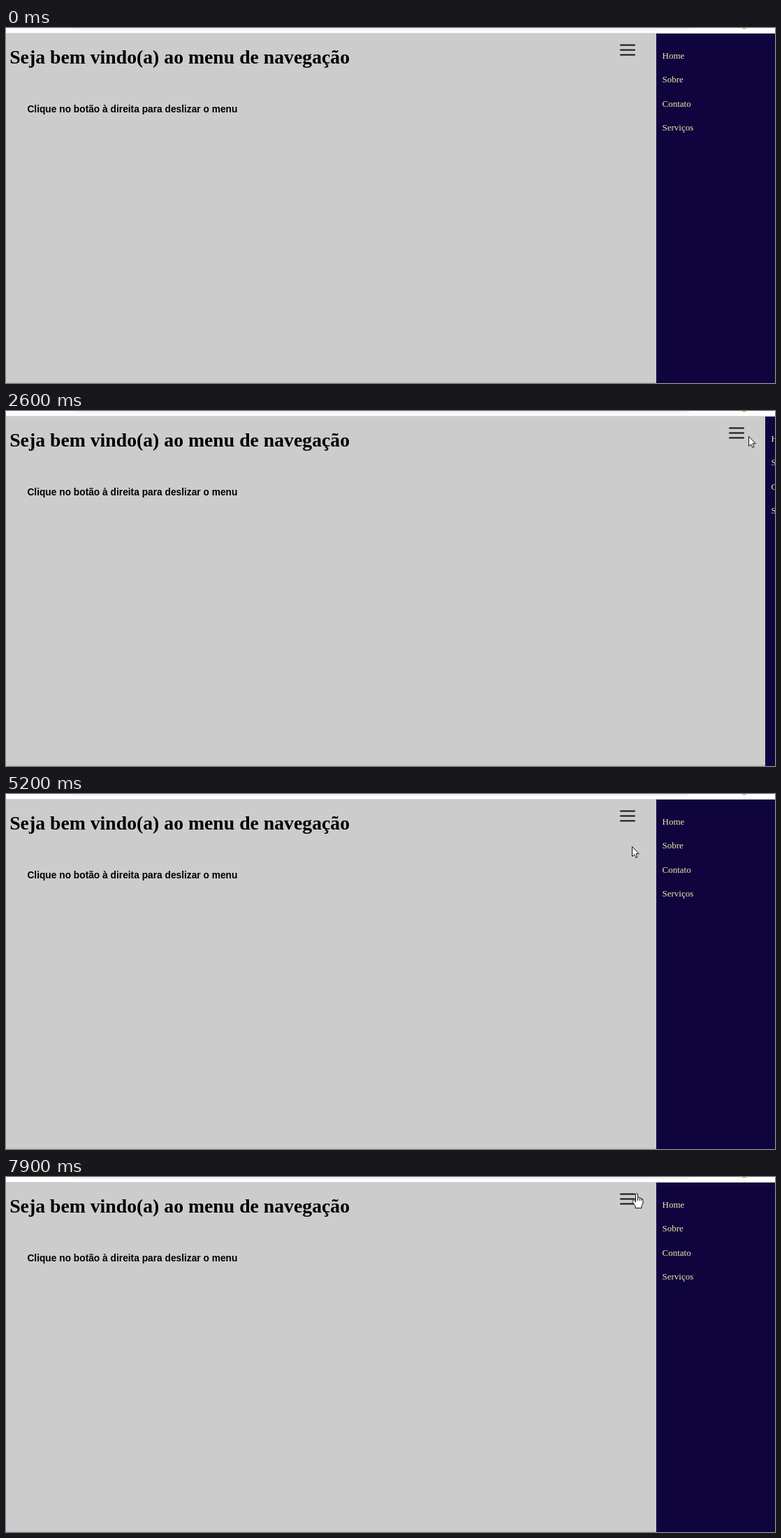
Recreate the animation shown at these times as an HTML page. Size 1101 by 509 pixels, loop 8000 ms.

```html
<!DOCTYPE html>
<html lang="pt">
<head>
<meta charset="utf-8">
<style>
  html, body { margin: 0; width: 100%; height: 100%; overflow: hidden; background: #ccc; }
  svg { display: block; width: 1101px; height: 509px; }
  .title { font: bold 27.74px "Liberation Serif", serif; }
  .hint { font: bold 13.75px "Liberation Sans", sans-serif; }
  #menu text { font: 13px "Liberation Serif", serif; fill: #eee8aa; }
  #cursor path { fill: #fff; stroke: #111; stroke-linejoin: round; }
</style>
</head>
<body>
<svg viewBox="0 0 1101 509">
  <rect width="1101" height="509" fill="#ccc"/>
  <rect y="507.5" width="1101" height="1.5" fill="#c3c3c3"/>
  <rect width="1101" height="7" fill="#fff"/>
  <rect y="7" width="1101" height="1" fill="#d6d6d6"/>
  <rect x="88" y="-25" width="898" height="28" rx="14" fill="#f1f3f4"/>
  <circle cx="1057" cy="-6" r="7" fill="#54b435"/>
  <text class="title" x="5.2" y="51">Seja bem vindo(a) ao menu de navegação</text>
  <text class="hint" x="30.4" y="121">Clique no botão à direita para deslizar o menu</text>
  <g id="menu">
    <path d="M880 24.5h20M880 31.5h20M880 38.5h20" stroke="#111" stroke-width="2" stroke-linecap="round"/>
    <rect x="931" y="8" width="170" height="501" fill="#10043e"/>
    <rect id="highlight" x="931" width="170" height="34.5" fill="#020456"/>
    <text x="939.5" y="43.5">Home</text>
    <text x="939.5" y="78">Sobre</text>
    <text x="939.5" y="112.5">Contato</text>
    <text x="939.5" y="147">Serviços</text>
  </g>
  <g id="cursor">
    <path id="arrow" d="M.5 .5V14.5L3.8 11.6 5.8 16.4 8 15.5 6 10.7H10.2Z"/>
    <path id="hand" d="M-1.5 1.5Q0 -.5 1.5 1.5V6.5Q3.5 5.3 4.3 7.2 6 6.3 6.8 8.2 9 7.7 9 10.5V15L7 18.5V21.5H-2V19L-6 12.5Q-6 9.6 -3.6 10.8L-1.5 13ZM1.5 6.5V11M4.3 7.2V11M6.8 8.2V11"/>
  </g>
</svg>
<script>
const LOOP = 8000, STEP = 100;
const PANEL_X = 931, PANEL_WIDTH = 170;
const CLOSE_AT = 1378, OPEN_AT = 2558, SLIDE_MS = 450;
const ITEM_TOP = 22, ITEM_HEIGHT = 34.5, ITEM_COUNT = 4;

// Where the pointer goes; it glides straight from one stop to the next
const stops = [
  { x: 47, y: -24, at: 0 },
  { x: 853, y: 39, at: 900 },
  { x: 891, y: 30, at: 1200, until: 1600 },
  { x: 1063, y: 36, at: 2200, until: 3300 },
  { x: 199, y: 16, at: 3900 },
  { x: 64, y: -12, at: 4200 },
  { x: 59, y: -20, at: 4500 },
  { x: 660, y: -40, at: 4800 },
  { x: 896, y: 75, at: 5200 },
  { x: 958, y: 40, at: 5500, until: 5700 },
  { x: 965, y: 132, at: 6100, until: 6500 },
  { x: 966, y: 79, at: 7200 },
  { x: 960, y: 38, at: 7600, until: 7700 },
  { x: 903, y: 23, at: 7900 }
];

const el = id => document.getElementById(id);
const menu = el("menu"), highlight = el("highlight"), cursor = el("cursor");
const show = (node, on) => node.setAttribute("visibility", on ? "visible" : "hidden");
const move = (node, x, y) => node.setAttribute("transform", `translate(${x} ${y})`);
const clamp = k => Math.min(1, Math.max(0, k));

// CSS "ease": cubic-bezier(.25, .1, .25, 1)
function ease(x) {
  const bezier = (a, b, s) => 3 * a * s * (1 - s) ** 2 + 3 * b * s * s * (1 - s) + s ** 3;
  let low = 0, high = 1;
  for (let i = 0; i < 24; i++) {
    const mid = (low + high) / 2;
    if (bezier(.25, .25, mid) < x) low = mid; else high = mid;
  }
  return bezier(.1, 1, low);
}

function pointerAt(t) {
  const i = stops.findLastIndex(stop => stop.at <= t);
  const from = stops[i], to = stops[i + 1] || from;
  const leave = from.until || from.at;
  const k = clamp((t - leave) / (to.at - leave || 1));
  return [from.x + (to.x - from.x) * k, from.y + (to.y - from.y) * k].map(Math.round);
}

function slideAt(t) {
  const progress = start => ease(clamp((t - start) / SLIDE_MS));
  return Math.round(PANEL_WIDTH * (progress(CLOSE_AT) - progress(OPEN_AT)));
}

function draw(t) {
  const slide = slideAt(t), [x, y] = pointerAt(t);
  const item = Math.floor((y - ITEM_TOP) / ITEM_HEIGHT);
  const onItem = x >= PANEL_X + slide && item >= 0 && item < ITEM_COUNT;
  const onButton = Math.abs(x - 890 - slide) <= 13 && y >= 20 && y <= 43;
  move(menu, slide, 0);
  move(cursor, x, y);
  highlight.setAttribute("y", ITEM_TOP + ITEM_HEIGHT * item);
  show(highlight, onItem);
  show(el("hand"), onItem || onButton);
  show(el("arrow"), !onItem && !onButton);
}

function tick() {
  const t = performance.now() % LOOP;
  draw(Math.floor(t / STEP) * STEP);
  requestAnimationFrame(tick);
}
tick();
</script>
</body>
</html>
```
